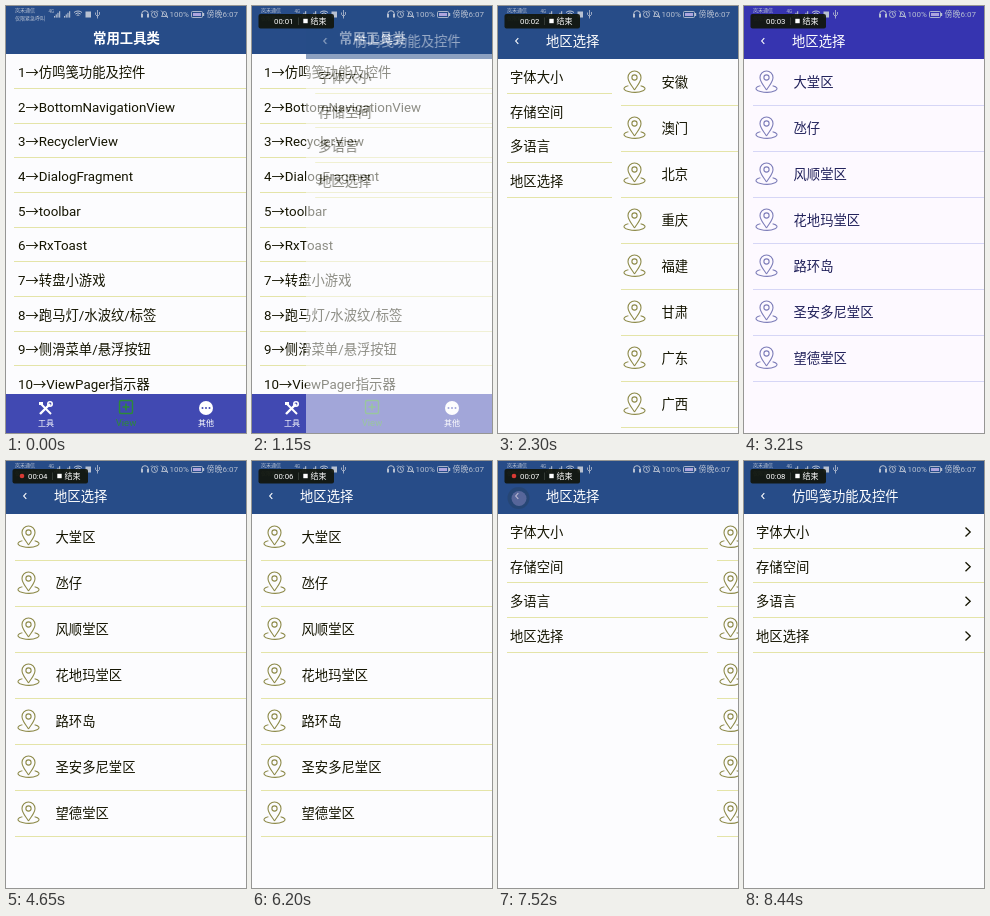
Animation of 240 by 427 pixels, one loop 8.5 s. Source, as an HTML page with a canvas:

```html
<!DOCTYPE html>
<html lang="zh-CN">
<head>
<meta charset="utf-8">
<style>
html, body { margin: 0; width: 100%; height: 100%; overflow: hidden; background: #fcfcfe; }
canvas { display: block; width: 240px; height: 427px; }
</style>
</head>
<body>
<canvas id="stage"></canvas>
<script>
const W = 240, H = 427, LOOP = 8500;
const NAV = '#4149b2', GREEN = '#2d8a38', PALE = '#b8c1d2';
const FONT = 'Roboto, "Noto Sans CJK SC", "Noto Sans CJK", sans-serif';
const BLUE_THEME = { header: '#274c88', paper: '#fcfcfe', ink: '#141400', line: '#e4e4a8', pin: '#8c8948' };
const INDIGO_THEME = { header: '#3634b0', paper: '#fdf9ff', ink: '#20205a', line: '#d6d6f6', pin: '#7c7cb8' };
let theme = BLUE_THEME;

const APP_TITLE = '仿鸣笺功能及控件', REGION_TITLE = '地区选择';
const TOOLS = [APP_TITLE, 'BottomNavigationView', 'RecyclerView', 'DialogFragment', 'toolbar',
  'RxToast', '转盘小游戏', '跑马灯/水波纹/标签', '侧滑菜单/悬浮按钮', 'ViewPager指示器'];
const SETTINGS = ['字体大小', '存储空间', '多语言', REGION_TITLE];
const PROVINCES = ['安徽', '澳门', '北京', '重庆', '福建', '甘肃', '广东', '广西'];
const DISTRICTS = ['大堂区', '氹仔', '风顺堂区', '花地玛堂区', '路环岛', '圣安多尼堂区', '望德堂区'];

const canvas = document.getElementById('stage');
const ctx = canvas.getContext('2d');
const dpr = window.devicePixelRatio || 1;
canvas.width = W * dpr;
canvas.height = H * dpr;

const progress = (t, start, length) => Math.min(1, Math.max(0, (t - start) / length));
const easeInOut = p => (1 - Math.cos(Math.PI * p)) / 2;

function rect(x, y, w, h, color) {
  ctx.fillStyle = color;
  ctx.fillRect(x, y, w, h);
}

function roundRect(x, y, w, h, r, color) {
  ctx.fillStyle = color;
  ctx.beginPath();
  ctx.roundRect(x, y, w, h, r);
  ctx.fill();
}

// y is the middle of the glyphs
function text(s, x, y, size, color, align = 'left', weight = 400) {
  ctx.font = `${weight} ${size}px ${FONT}`;
  ctx.textAlign = align;
  ctx.textBaseline = 'alphabetic';
  ctx.fillStyle = color;
  ctx.fillText(s, x, y + size * 0.37);
}

function stroke(color, width, build) {
  ctx.strokeStyle = color;
  ctx.lineWidth = width;
  ctx.beginPath();
  build();
  ctx.stroke();
}

function polyline(color, width, ...pts) {
  stroke(color, width, () => pts.forEach(([x, y]) => ctx.lineTo(x, y)));
}

function disc(x, y, r, color) {
  ctx.fillStyle = color;
  ctx.beginPath();
  ctx.arc(x, y, r, 0, 7);
  ctx.fill();
}

function ring(x, y, r, color, width) {
  stroke(color, width, () => ctx.arc(x, y, r, 0, 7));
}

function separator(x, y) {
  rect(x, Math.round(y), W - x, 1, theme.line);
}

function navBar() {
  rect(0, 388, W, 39, NAV);
  polyline('#fff', 2, [34, 397], [45, 408]);
  polyline('#fff', 2.4, [34, 408], [44, 398]);
  ring(44, 398, 2.2, '#fff', 1.6);
  rect(33, 396, 4, 3, '#fff');
  stroke(GREEN, 1.4, () => ctx.roundRect(113.5, 394.5, 13, 13, 1.5));
  polyline(GREEN, 1.6, [120, 397.5], [120, 404.5]);
  polyline(GREEN, 1.6, [116.5, 401], [123.5, 401]);
  disc(200, 402, 7, '#fff');
  for (const x of [196.5, 200, 203.5]) disc(x, 402, 1, NAV);
  text('工具', 40, 417, 8, '#fff', 'center');
  text('View', 120, 416, 9.5, GREEN, 'center');
  text('其他', 200, 417, 8, '#fff', 'center');
}

function homePage() {
  rect(0, 0, W, H, theme.paper);
  rect(0, 0, W, 48, theme.header);
  text('常用工具类', 120.5, 32.5, 13.4, '#fff', 'center', 700);
  TOOLS.forEach((name, i) => {
    text(`${i + 1}→${name}`, 12, 66 + i * 34.67, 13.33, theme.ink);
    separator(8, 82 + i * 34.67);
  });
  navBar();
}

function header(title) {
  rect(0, 0, W, 53, theme.header);
  polyline('#fff', 1.1, [20.3, 32.2], [17.7, 35], [20.3, 37.8]);
  text(title, 48, 35.2, 13.33, '#fff', 'left', 500);
}

function settingsList() {
  rect(0, 53, W, H - 53, theme.paper);
  SETTINGS.forEach((name, i) => {
    const y = 71 + i * 34.67;
    text(name, 12, y, 13.33, theme.ink);
    polyline(theme.ink, 1.3, [221.5, y - 4.5], [226.2, y], [221.5, y + 4.5]);
    separator(9, y + 15.6);
  });
}

function pin(x, y) {
  stroke(theme.pin, 1.1, () => {
    ctx.moveTo(x, y + 8);
    ctx.bezierCurveTo(x - 3, y + 3, x - 6.5, y, x - 6.5, y - 4.5);
    ctx.arc(x, y - 4.5, 6.5, Math.PI, 0);
    ctx.bezierCurveTo(x + 6.5, y, x + 3, y + 3, x, y + 8);
  });
  ring(x, y - 4.5, 2.6, theme.pin, 1.1);
  stroke(theme.pin, 1.1, () => ctx.ellipse(x, y + 6.6, 10.5, 3.6, 0, -0.95, Math.PI + 0.95));
}

function placeList(names, offset) {
  if (offset >= W) return;
  ctx.save();
  ctx.translate(Math.round(offset), 0);
  rect(0, 53, W, H - 53, theme.paper);
  names.forEach((name, i) => {
    const y = 76.4 + i * 46;
    pin(22.5, y - 0.4);
    text(name, 49.5, y, 13.33, theme.ink);
    separator(9, y + 22.4);
  });
  ctx.restore();
}

function detailPage(t) {
  const inRegion = t >= 2146 && t < 7640;
  settingsList();
  if (inRegion) {
    if (t < 3190) placeList(PROVINCES, W * (1 - easeInOut(progress(t, 2146, 300))));
    const enter = easeInOut(progress(t, 2880, 300));
    const leave = easeInOut(progress(t, 7290, 300));
    placeList(DISTRICTS, W * (1 - enter + leave));
  }
  header(inRegion ? REGION_TITLE : APP_TITLE);
  const press = progress(t, 7060, 120) * (1 - progress(t, 7450, 200));
  if (press > 0) {
    disc(20.5, 37, 11, `rgba(40,56,64,${0.4 * press})`);
    disc(21, 37.5, 7.5, `rgba(165,155,215,${0.6 * press})`);
  }
}

function signal(x) {
  for (let i = 0; i < 4; i++) rect(x + i * 1.7, 10 - i * 1.6, 1.1, 1.6 + i * 1.6, PALE);
}

function statusBar() {
  text('岚禾通信', 9, 4.5, 5, PALE);
  text('仅限紧急呼叫', 9, 12, 5, PALE);
  text('4G', 42.5, 5.5, 4.5, PALE);
  signal(48);
  signal(58);
  for (const r of [2, 4, 6]) stroke(PALE, 1, () => ctx.arc(72, 11, r, -2.3, -0.84));
  rect(79.5, 5.5, 5.5, 6, PALE);
  polyline(PALE, 0.8, [91.5, 4], [91.5, 12.5]);
  polyline(PALE, 0.8, [89.5, 6.5], [89.5, 8.5], [91.5, 10.5], [93.5, 8.5], [93.5, 6]);

  stroke(PALE, 1, () => ctx.arc(139, 8, 3.3, Math.PI, 0));
  rect(135, 8, 2, 3.5, PALE);
  rect(141, 8, 2, 3.5, PALE);
  ring(148.5, 8.5, 3, PALE, 0.9);
  polyline(PALE, 0.8, [148.5, 6.5], [148.5, 8.7], [150, 9.5]);
  polyline(PALE, 0.8, [144.7, 6], [146.3, 4.4]);
  polyline(PALE, 0.8, [150.7, 4.4], [152.3, 6]);
  polyline(PALE, 0.9, [155.5, 10.5], [156.5, 9], [156.5, 7], [158.5, 5], [160.5, 7], [160.5, 9], [161.5, 10.5], [155.5, 10.5]);
  polyline(PALE, 0.9, [155, 4.5], [162, 12]);
  text('100%', 163.5, 8.5, 8, PALE);
  stroke(PALE, 0.9, () => ctx.roundRect(185.5, 5.5, 11, 6, 1));
  rect(187, 7, 8, 3, '#aca4de');
  rect(197, 7, 1.2, 3, PALE);
  text('傍晚6:07', 200.5, 8.5, 8, PALE);
}

function recorder(t) {
  if (t < 60) return;
  ctx.globalAlpha = progress(t, 0, 170);
  roundRect(6.5, 8, 75.5, 14.5, 2, 'rgba(18,22,12,.93)');
  if (t % 1000 >= 500) disc(16, 15, 2.3, '#d83a34');
  text(`00:0${Math.floor(t / 1000)}`, 22, 15.2, 7.8, '#fff');
  rect(46, 11.5, 0.6, 7.5, '#4a504c');
  rect(51.3, 12.8, 4.4, 4.4, '#fff');
  text('结束', 58.5, 15.2, 8, '#fff');
  ctx.globalAlpha = 1;
}

// the detail page as one layer, so that it can be faded as a whole
let cachedLayer;
function pageLayer() {
  if (!cachedLayer) {
    cachedLayer = document.createElement('canvas');
    cachedLayer.width = canvas.width;
    cachedLayer.height = canvas.height;
    detailPage(0);
    cachedLayer.getContext('2d').drawImage(canvas, 0, 0);
  }
  return cachedLayer;
}

function draw(t) {
  ctx.setTransform(dpr, 0, 0, dpr, 0, 0);
  const open = progress(t, 920, 440);
  if (open < 1) {
    const layer = pageLayer();
    homePage();
    ctx.globalAlpha = open;
    ctx.drawImage(layer, W * (1 - open) ** 2, 0, W, H);
    ctx.globalAlpha = 1;
  } else {
    theme = t >= 3200 && t < 3790 ? INDIGO_THEME : BLUE_THEME;
    detailPage(t);
  }
  statusBar();
  recorder(t);
}

function tick() {
  draw(performance.now() % LOOP);
  requestAnimationFrame(tick);
}
tick();
</script>
</body>
</html>
```
